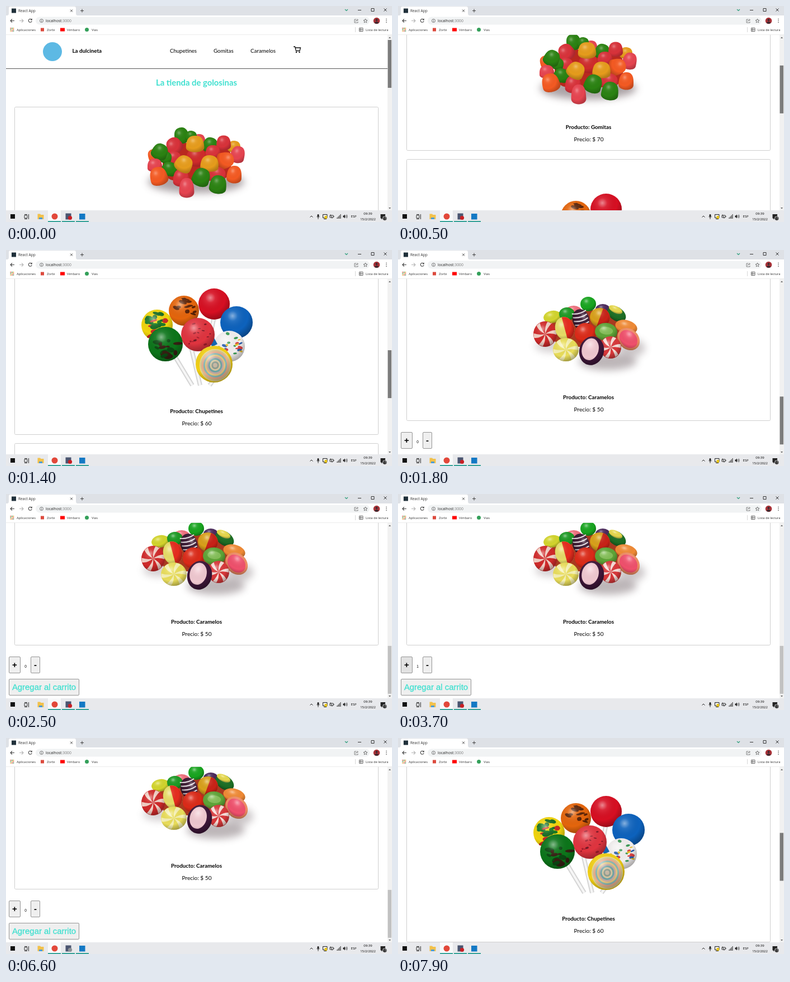
An HTML page that plays this animation: 690 px wide and 388 px high, repeating every 8000 ms.

```html
<!DOCTYPE html>
<html lang="es">
<head>
<meta charset="utf-8">
<title>Tienda</title>
<style>
html, body { margin: 0; height: 100%; overflow: hidden; background: #fff; }
svg { display: block; width: 690px; height: 388px; }
text { font-family: "Open Sans", sans-serif; white-space: pre; }
#page text { font-family: Lato, sans-serif; }
#page .ui { font-family: "Liberation Sans", Arial, sans-serif; }
</style>
</head>
<body>
<svg id="stage" viewBox="0 0 690 388"></svg>
<script>
const TURQUOISE = '#40e0d0';

// ---- drawing helpers -------------------------------------------------
const text = (x, y, s, size, attrs = '') => `<text x="${x}" y="${y}" font-size="${size}" ${attrs}>${s}</text>`;
const rect = (x, y, w, h, fill, attrs = '') =>
  `<rect x="${x}" y="${y}" width="${w}" height="${h}" fill="${fill}" ${attrs}/>`;
const oval = (x, y, rx, ry, fill, attrs = '') =>
  `<ellipse cx="${x}" cy="${y}" rx="${rx}" ry="${ry}" fill="${fill}" ${attrs}/>`;
const dot = (x, y, r, fill, attrs) => oval(x, y, r, r, fill, attrs);
const line = (d, stroke = '#444', width = 1, attrs = '') =>
  `<path d="${d}" fill="none" stroke="${stroke}" stroke-width="${width}" ${attrs}/>`;
const group = (transform, body) => `<g transform="${transform}">${body}</g>`;
const shadow = (x, y, rx, ry, opacity) => oval(x, y, rx, ry, '#5a4a50', `opacity="${opacity}" filter="url(#soft)"`);
const middle = 'text-anchor="middle"';

function random(seed) {
  return () => (seed = (seed * 16807) % 2147483647) / 2147483647;
}

const candy = (x, y, rx, ry, fill, tilt = 0, marks = '') => group(`translate(${x} ${y}) rotate(${tilt})`,
  oval(0, 0, rx, ry, fill) + marks + oval(0, 0, rx, ry, 'url(#shine)'));

function gumdrop([x, y, w, h, fill, tilt]) {
  const shape = 'M-.48 .2C-.47 -.28 -.34 -.5 0 -.5S.47 -.28 .48 .2C.49 .58 -.49 .58 -.48 .2Z';
  return group(`translate(${x} ${y}) rotate(${tilt}) scale(${w} ${h})`,
    `<path d="${shape}" fill="${fill}"/><path d="${shape}" fill="url(#shine)" opacity=".7"/>`);
}

function specks(r, colors, count, size, seed) {
  const next = random(seed);
  return Array.from({ length: count }, (_, i) => {
    const angle = next() * 6.28, dist = Math.sqrt(next()) * r * .85;
    return oval(dist * Math.cos(angle), dist * Math.sin(angle), size * (.5 + next()), size * (.3 + next() * .5),
      colors[i % colors.length], `transform="rotate(${next() * 60 - 30})"`);
  }).join('');
}

const swirl = (rx, ry, color, n = 6) => group(`scale(${rx} ${ry})`, Array.from({ length: n }, (_, i) =>
  `<path d="M0 0Q.5 -.35 .93 -.3A1 1 0 0 1 .97 .05Q.5 -.1 0 0Z" fill="${color}" transform="rotate(${i * 360 / n})"/>`).join(''));

// ---- products --------------------------------------------------------
function gumdrops() {
  const G = '#2b8212', Y = '#e69c1c', O = '#f45a22', R = '#d8323a', P = '#e64450';
  return shadow(340, 316, 86, 20, .5) +
    rect(280, 246, 122, 68, '#b9281f', 'rx="24"') + [
      [345, 241, 24, 22, P, 0], [408, 253, 24, 22, Y, 10], [264, 268, 22, 22, O, -20], [365, 250, 28, 28, G, 15],
      [389, 246, 27, 27, R, 0], [314, 233, 28, 30, G, -15], [331, 234, 22, 20, G, 10], [301, 251, 30, 30, R, -30],
      [300, 273, 28, 24, R, 10], [285, 272, 24, 22, G, 20], [275, 262, 30, 30, G, 25], [370, 262, 28, 24, R, 0],
      [340, 272, 38, 34, '#cf2b2b', 10], [338, 248, 34, 30, Y, 0], [414, 267, 27, 31, P, 15], [266, 286, 28, 24, P, -5],
      [392, 277, 31, 31, O, 75], [292, 293, 30, 26, G, 15], [313, 309, 30, 32, R, 0], [378, 303, 32, 28, R, 20],
      [273, 306, 33, 34, O, -15], [318, 284, 33, 31, Y, 30], [364, 283, 34, 30, Y, 5], [349, 308, 33, 34, G, 20],
      [379, 321, 32, 34, G, 8], [408, 303, 28, 32, O, 5], [323, 327, 28, 36, P, 0]
    ].map(gumdrop).join('');
}

function lollipops() {
  const stick = d => line(d, '#d5d5d5', 8) + line(d, '#f6f6f6', 4);
  const rings = ['#d9c58e', '#e9a98d', '#86b8b2', '#e3c47f', '#c4a7a0', '#6fa3a5', '#d6c7a0', '#8e9e90', '#c9b9a4'];
  const ball = (x, y, r, fill, marks) => candy(x, y, r, r, fill, 0, marks);
  return stick('M300 188L333 243') + stick('M331 175L347 243') + stick('M372 120L366 150') + stick('M372 232L364 243') +
    ball(372, 97, 28, '#d70f22') +
    ball(318, 109, 27, '#e4650c', specks(27, ['#5a2206'], 12, 5, 81)) +
    ball(270, 135, 28, '#f0d40d', specks(28, ['#187a25', '#c92a23', '#176b22'], 24, 6, 15)) +
    ball(412, 130, 29, '#0d62bd') +
    ball(399, 173, 28, '#f1eeee', specks(27, ['#2a5fae', '#d94343', '#e4bd28', '#3a9a55'], 20, 3.2, 73)) +
    `<path d="M365 165L372 158L378 169L368 174Z" fill="#1265b0"/>` +
    ball(343, 152, 30, '#e0343f', specks(29, ['#731724', '#a31c2b'], 14, 2.2, 44)) +
    ball(285, 169, 31, '#0c751a', specks(29, ['#351f12', '#0a4912'], 15, 6, 29)) +
    candy(372, 205, 33, 33, '#f1cf16', 0, oval(2, 2, 28, 29, '#f3e2a0') +
      rings.map((color, i) => oval(2, 2, 27 - i * 2.9, 28 - i * 3, color)).join(''));
}

function caramels() {
  const stripes = [-14, -7, 0, 7, 14].map(x => line(`M${x} -13Q${x + 5} 0 ${x} 13`, '#e8dfe4', 2)).join('');
  const half = (rx, ry, color) => `<path d="M0 ${-ry}A${rx} ${ry} 0 0 1 0 ${ry}Z" fill="${color}"/>`;
  return shadow(375, 200, 52, 16, .4) + shadow(418, 176, 24, 16, .3) + shadow(275, 172, 30, 12, .25) +
    rect(275, 108, 125, 66, '#a83a20', 'rx="26"') +
    candy(314, 109, 14, 9, '#ef6f7c') + candy(366, 106, 13, 9, '#4b2a5c') + candy(340, 97, 14, 13, '#18a51f') +
    candy(276, 120, 16, 11, '#d3d52c', -10) + candy(302, 115, 14, 12, '#1d9a24') +
    candy(391, 115, 18, 12, '#1d6e25', 35) + candy(389, 107, 13, 6, '#e6d84c', 25) +
    candy(408, 138, 20, 12, '#f08a35', 15) +
    candy(361, 121, 18, 17, '#d9a01a', 20, half(18, 17, '#c92217')) +
    candy(327, 125, 19, 15, '#3d1c35', 75, stripes) +
    candy(263, 151, 21, 23, '#d02a2a', 0, swirl(21, 23, '#f1cfc4')) +
    candy(298, 141, 17, 21, '#e6dc66', -15, half(17, 21, '#e62c1e')) +
    candy(335, 150, 19, 19, '#dc2a18') +
    candy(372, 147, 20, 16, '#5ea437', 5, oval(0, -2, 12, 7, '#84bf58')) +
    candy(412, 160, 22, 18, '#f08d63', 45, oval(0, 0, 18, 14, '#f0506c')) +
    candy(380, 175, 19, 20, '#d8383a', 0, swirl(19, 20, '#f6dcd6')) +
    candy(300, 179, 23, 21, '#e9dd5a', 0, swirl(23, 21, '#f5f0b4')) +
    candy(346, 181, 22, 26, '#3d1638', 15, oval(-3, -2, 15, 20, '#f0c8d0'));
}

const card = (top, bottom, name, price, picture) =>
  rect(15.5, top + .5, 650, bottom - top - 1, '#fff', 'stroke="#cfcfcf" rx="2"') + picture +
  text(340.5, bottom - 39, `Producto: ${name}`, 9.8, `${middle} font-weight="700"`) +
  text(341, bottom - 17, `Precio: $ ${price}`, 10.1, middle);

const button = (id, x, y, w, label, size, attrs) =>
  rect(x + .5, y + .5, w - 1, 29, '#efefef', `id="${id}" stroke="#949494" rx="1.5"`) +
  text(x + w / 2, y + 15 + size * .36, label, size, `class="ui" ${middle} ${attrs}`);

const page = `<g id="page">` +
  rect(0, 52, 682, 1100, '#fff') +
  dot(83, 82, 17, '#5db9e4') +
  text(118.5, 84, 'La dulcineta', 9.8, 'font-weight="700"') +
  text(293, 83.5, 'Chupetines', 9.6) + text(371, 83.5, 'Gomitas', 9.8) + text(437, 83.5, 'Caramelos', 9.8) +
  line('M514 73H516.5L518.5 80.5H525L526.5 75H517', '#111', 1.3) + dot(519, 83, 1.2, '#111') + dot(524.5, 83, 1.2, '#111') +
  line('M0 112.5H682', '#555') +
  text(340.5, 143, 'La tienda de golosinas', 14.8, `${middle} font-weight="700" fill="${TURQUOISE}"`) +
  card(181, 428, 'Gomitas', 70, gumdrops()) +
  card(443, 768, 'Chupetines', 60, group('translate(0 436)', lollipops())) +
  card(783, 1048, 'Caramelos', 50, group('translate(0 741)', caramels())) +
  button('plus', 5, 1068, 21, '+', 15, 'font-weight="700"') +
  button('minus', 44, 1068, 17, '-', 15, 'font-weight="700"') +
  text(35, 1088.3, '0', 6.5, `id="count" class="ui" ${middle}`) +
  button('add', 5, 1108, 126, 'Agregar al carrito', 14.9, `fill="${TURQUOISE}" stroke="${TURQUOISE}" stroke-width=".3"`) + '</g>';

// ---- browser and taskbar ---------------------------------------------
const grid = (x, y) => [0, 1, 2].map(i => [0, 1, 2].map(j =>
  rect(x + i * 2.5, y + j * 2.5, 1.7, 1.7, ['#d9534a', '#4a9a5c', '#e0a32e'][(i + j) % 3])).join('')).join('');

const browser =
  rect(0, 0, 690, 17, '#dee1e6') +
  '<path d="M2 17Q5 17 5 13V4Q5 1 8 1H122Q125 1 125 4V13Q125 17 128 17Z" fill="#fff"/>' +
  rect(10, 4.5, 8, 8, '#20303a') + text(22, 11, 'React App', 6.6, 'fill="#333"') +
  line('M115 6.5L119 10.5M119 6.5L115 10.5M133 8.5H139M136 5.5V11.5', '#444') +
  line('M606 6L608.5 8.5L611 6', '#2a9d7a', 1.2) +
  line('M629 7.5H635M675.5 4.5L680.5 9.5M680.5 4.5L675.5 9.5', '#222', .9) +
  line('M653 4.5H658V9.5H653Z', '#222', .9) +
  rect(0, 17, 690, 34.5, '#fff') + rect(53, 19.5, 597, 14, '#f1f3f4', 'rx="7"') +
  line('M15 26.5H8M11 23.5L8 26.5L11 29.5', '#444', 1.1) +
  line('M24 26.5H31M28 23.5L31 26.5L28 29.5', '#b5b5b5', 1.1) +
  line('M45.6 24.3A3 3 0 1 0 46.2 27.3M46.2 22.8V25H44', '#444', 1.1) +
  line('M60.5 26.5A3 3 0 1 0 66.5 26.5A3 3 0 1 0 60.5 26.5M63.5 26V28.3M63.5 24.5V25.3', '#555', .8) +
  text(71, 29, 'localhost<tspan fill="#777">:3000</tspan>', 6.8, 'fill="#222"') +
  line('M626 24H623V30H629V28M625 28Q625 25 629 25M627.5 23.3L629.5 25L627.5 26.7', '#666', .8) +
  line('M642.5 23L643.5 25.4L646 25.6L644.1 27.3L644.7 29.8L642.5 28.5L640.3 29.8L640.9 27.3L639 25.6L641.5 25.4Z', '#555', .8) +
  dot(662.5, 26.5, 5.8, '#a83238') + dot(662.5, 25, 2, '#3c2930') +
  '<path d="M658.5 30.5Q662.5 25 666.5 30.5Q662.5 33 658.5 30.5Z" fill="#3c2930"/>' +
  [23.5, 26.5, 29.5].map(y => dot(680, y, .8, '#444')).join('') +
  grid(7.5, 39) + text(19, 44.7, 'Aplicaciones', 5.9, 'fill="#333"') +
  rect(62, 39.5, 6, 6, '#dc4a3d') + text(73, 44.7, 'Zorbi', 5.9, 'fill="#333"') +
  rect(97, 39.5, 8, 6, '#f00') + text(109, 44.7, 'Vimbaro', 5.9, 'fill="#333"') +
  dot(144.5, 42.5, 3.5, '#34a05a') + text(153, 44.7, 'Vias', 5.9, 'fill="#333"') +
  line('M624.5 38V47', '#ccc', .8) + line('M631.5 39.5H638V45.5H631.5ZM634 39.5V45.5M631.5 42.5H638', '#444', .8) +
  text(643, 44.7, 'Lista de lectura', 5.75, 'fill="#333"') +
  line('M0 51.5H690', '#e6e6e6', .7) +
  rect(682, 52, 8, 315, '#f1f1f1') + rect(682.5, 61, 6.5, 86, '#7b7b7b', 'id="thumb"') +
  '<path d="M684 58L686 55.5L688 58ZM684 362L686 364.5L688 362Z" fill="#666"/>';

const taskbar =
  rect(0, 367, 690, 21, '#e8e9ec') + rect(75, 367, 23, 21, '#f8f9fa') +
  rect(8, 374, 8, 8, '#111') +
  line('M33 376H38V381H33ZM33 374.5H38M33 382.5H38M40.5 374V383', '#222', .9) +
  '<path d="M56.5 373.5H61L62.5 375H67.5V383H56.5Z" fill="#f2c14b"/>' + rect(59, 380, 6, 3, '#4a9bd8') +
  dot(87, 378, 5.5, '#e2483a') + rect(106.5, 372.5, 10, 11, '#4b5570') + dot(114.5, 380.5, 3.6, '#c81f24', 'id="badge"') +
  rect(131, 373, 10.5, 10.5, '#1479c4') +
  [75, 100, 125].map(x => rect(x, 386.3, 23, 1.7, '#1b978b')).join('') +
  line('M543.5 379.5L546 377L548.5 379.5', '#222') +
  rect(556.5, 374, 3, 5, '#222', 'rx="1.5"') + line('M555.5 378Q558 382 560.5 378M558 380V383', '#222', .8) +
  line('M566.5 374.5H574V380.5H566.5ZM568 382.5H573', '#222') + rect(569.5, 377, 4.5, 5, '#e8c51c') +
  line('M579 376H585V380H579ZM586 377V379M580 374.5L583 381.5', '#222', .9) +
  line('M592 382V380M594 382V378M596 382V376M598 382V374', '#333', 1.1) +
  '<path d="M602.5 376.5H604L606 374.5V381.5L604 379.5H602.5Z" fill="#222"/>' +
  line('M607.3 376Q608.6 378 607.3 380M609 374.7Q611.2 378 609 381.3', '#222', .8) +
  text(621.5, 380.3, 'ESP', 5.9, middle) +
  text(647, 375.3, '09:39', 6, middle) + text(647, 384.5, '15/2/2022', 5.8, middle) +
  '<path d="M669.5 374H678V381.5H673L671 383.5V381.5H669.5Z" fill="#222"/>' + dot(677, 381.5, 3.8, '#222', 'stroke="#e8e9ec" stroke-width=".7"') +
  text(677, 383.2, '13', 4.6, `${middle} fill="#fff"`);

document.getElementById('stage').innerHTML = `<defs>
  <radialGradient id="shine" cx=".38" cy=".3" r=".72">
    <stop offset="0" stop-color="#fff" stop-opacity=".5"/><stop offset=".22" stop-color="#fff" stop-opacity=".1"/>
    <stop offset=".65" stop-color="#000" stop-opacity="0"/><stop offset="1" stop-color="#000" stop-opacity=".3"/>
  </radialGradient>
  <filter id="soft" x="-40%" y="-100%" width="180%" height="300%"><feGaussianBlur stdDeviation="7"/></filter>
</defs>` + page + browser + taskbar;

// ---- motion ----------------------------------------------------------
const LOOP = 8000, STEP = 100;
const scrollKeys = [[0, 0], [500, 168], [1400, 436], [1800, 741], [1900, 776], [6700, 776],
  [7100, 40], [7200, 0], [7400, 741], [7500, 741], [7900, 401], [8000, 401]];
const plusClicks = [3500, 4000, 4400], minusClicks = [5200, 5700, 6200];
const el = Object.fromEntries(['page', 'thumb', 'count', 'plus', 'minus', 'badge'].map(id => [id, document.getElementById(id)]));

function scrollAt(t) {
  const i = scrollKeys.findIndex(([end]) => t < end);
  const [t0, s0] = scrollKeys[i - 1], [t1, s1] = scrollKeys[i];
  return Math.round(s0 + (s1 - s0) * (t - t0) / (t1 - t0));
}

function frame(now) {
  const t = Math.floor(now % LOOP / STEP) * STEP;
  const scroll = scrollAt(t);
  const done = clicks => clicks.filter(c => c <= t).length;
  const within = (a, b) => t >= a && t < b;
  el.page.setAttribute('transform', `translate(0 ${-scroll})`);
  el.thumb.setAttribute('y', 61 + scroll * .273);
  el.thumb.setAttribute('fill', within(2200, 6700) ? '#c1c1c1' : '#7b7b7b');
  el.count.textContent = done(plusClicks) - done(minusClicks);
  el.plus.setAttribute('fill', within(3200, 4500) ? '#e2e2e2' : '#efefef');
  el.minus.setAttribute('fill', within(4800, 6400) ? '#e2e2e2' : '#efefef');
  el.badge.setAttribute('fill', t % 2000 >= 600 && t % 2000 < 1100 ? '#8d9096' : '#c81f24');
  requestAnimationFrame(frame);
}
requestAnimationFrame(frame);
</script>
</body>
</html>
```
